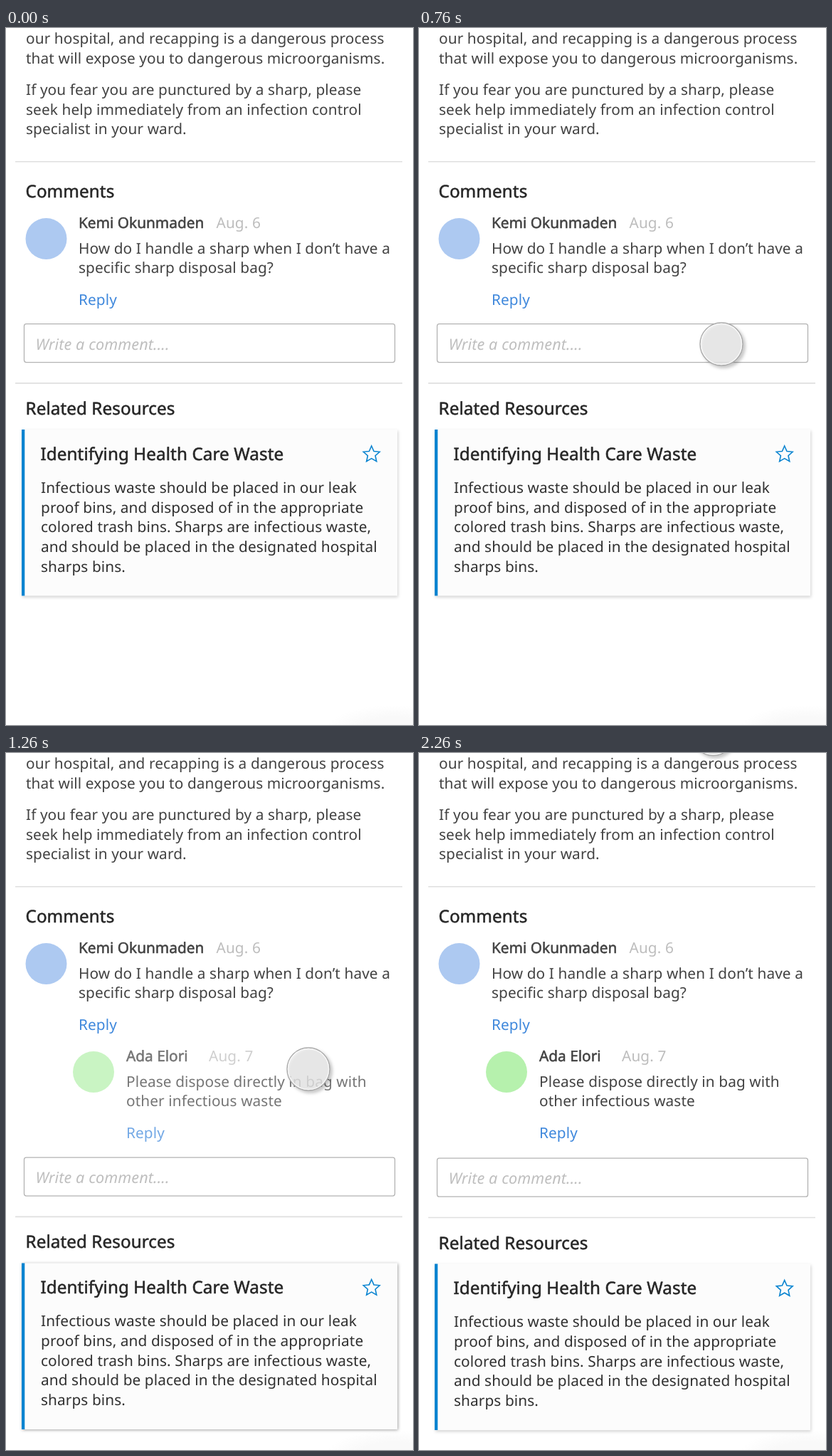
Recreate the animation shown at these times as an HTML page. Size 572 px wide and 979 px high, loop 2.28 s.

```html
<!DOCTYPE html>
<html lang="en">
<head>
<meta charset="utf-8">
<title>Comment thread</title>
<style>
html, body { margin: 0; width: 100%; height: 100%; overflow: hidden; background: #fff; }
svg { display: block; width: 572px; height: 979px; }
text {
  font: 20.8px "Noto Sans", "Open Sans", sans-serif; letter-spacing: .1px;
  fill: #424242; text-rendering: geometricPrecision; white-space: pre;
}
.head { font-size: 24.2px; fill: #262626; stroke: #262626; stroke-width: .55px; }
.name { stroke: #424242; stroke-width: .55px; letter-spacing: 0; }
.date { fill: #bdbdbd; }
.link { fill: #3f88dc; }
.hint { fill: #bfbfbf; font-size: 21.6px; font-style: italic; }
.card { fill: #303030; }
.rule { stroke: #dfdfdf; stroke-width: 1.6px; }
#panel { fill: #fcfcfc; }
#star { fill: none; stroke: #0a84d0; stroke-width: 1.6px; }
</style>
</head>
<body>
<svg viewBox="0 0 572 979">
  <defs>
    <radialGradient id="haze">
      <stop offset=".5" stop-color="#f9f9f9"/>
      <stop offset="1" stop-color="#fff"/>
    </radialGradient>
  </defs>
  <ellipse cx="545" cy="985" rx="95" ry="34" fill="url(#haze)"/>
  <g id="top">
    <path class="rule" d="M13 187.7H557"/>
    <circle cx="56.5" cy="296" r="29" fill="#adc9f1"/>
  </g>
  <g id="reply">
    <circle cx="123" cy="448" r="29" fill="#b6f1ad"/>
  </g>
  <g id="lower">
    <rect x="25.5" y="415.6" width="521" height="54" rx="3" fill="#fff" stroke="#b3b3b3" stroke-width="1.3"/>
    <path class="rule" d="M13 498.9H557"/>
    <rect id="panel" x="22" y="564" width="528" height="233.5"/>
    <path fill="#0a84d0" d="M22 564h4.3v233.5H22z"/>
    <polygon id="star"/>
  </g>
  <g id="cursor">
    <circle r="30" fill="#eee" fill-opacity=".78" stroke="#a8a8a8" stroke-width="1.4"/>
    <circle r="28.5" fill="none" stroke="#f6f6f6" stroke-width="1.4"/>
  </g>
</svg>
<script>
const LOOP = 2280;
const $ = id => document.getElementById(id);
const clamp = v => Math.max(0, Math.min(1, v));
const span = (t, from, to) => clamp((t - from) / (to - from));

function write(group, cls, x, y, ...lines) {
  lines.forEach((line, i) => {
    const el = document.createElementNS("http://www.w3.org/2000/svg", "text");
    el.setAttribute("class", cls);
    el.setAttribute("x", x);
    el.setAttribute("y", y + i * 27.7);
    el.textContent = line;
    $(group).append(el);
  });
  return $(group).lastChild;
}

write("top", "", 28, 22, "our hospital, and recapping is a dangerous process",
  "that will expose you to dangerous microorganisms.");
write("top", "", 28, 94, "If you fear you are punctured by a sharp, please",
  "seek help immediately from an infection control", "specialist in your ward.");
write("top", "head", 27.5, 237.5, "Comments");
write("top", "name", 102, 280.5, "Kemi Okunmaden");
write("top", "date", 295.5, 280.5, "Aug. 6");
write("top", "", 102, 316.5, "How do I handle a sharp when I don’t have a", "specific sharp disposal bag?");
write("top", "link", 102, 388.5, "Reply");

write("reply", "name", 169, 432.5, "Ada Elori");
write("reply", "date", 285, 432.5, "Aug. 7");
write("reply", "", 169, 468.5, "Please dispose directly in bag with", "other infectious waste");
write("reply", "link", 169, 540.5, "Reply");

write("lower", "hint", 41.5, 451.8, "Write a comment....");
const related = write("lower", "head", 27.5, 543, "Related Resources");
write("lower", "head", 48.5, 606.7, "Identifying Health Care Waste");
write("lower", "card", 49, 652.8, "Infectious waste should be placed in our leak",
  "proof bins, and disposed of in the appropriate",
  "colored trash bins. Sharps are infectious waste,",
  "and should be placed in the designated hospital", "sharps bins.");

$("star").setAttribute("points", Array.from({ length: 10 }, (_, i) => {
  const a = i * Math.PI / 5, r = i % 2 ? 5.6 : 12;
  return [513.7 + r * Math.sin(a), 599 - r * Math.cos(a)];
}).join(" "));

// Glide in from above, rest, then brush past the top edge.
function cursorAt(t) {
  if (t < 1540) {
    const k = 3.7, end = Math.exp(-k);
    const left = (Math.exp(-k * span(t, 45, 600)) - end) / (1 - end);
    return [425 + 45 * left, 444 - 478 * left - (t < 45 ? 40 : 0)];
  }
  const u = span(t, 1950, 2295);
  return [413 + 48 * (1 - u) ** 2, t < 1950 ? -80 : -34 + 25 * Math.sin(Math.PI * u)];
}

const shadow = (x, y, alpha) => `drop-shadow(${x}px ${y}px 2px rgba(0, 0, 0, ${alpha}))`;

function draw() {
  const t = performance.now() % LOOP;
  const u = span(t, 1150, 1350);
  const shift = t < 1080 ? 0 : 153.6 - 65.1 * (1 - u) ** 5;
  $("lower").setAttribute("transform", `translate(0 ${shift})`);
  related.style.opacity = t < 1080 ? 1 : 1 - .23 * (1 - u) ** 4;
  $("reply").style.opacity = 1 - (1 - u) ** 1.6;

  const moving = t >= 1080 && t < 1540;
  $("panel").style.filter = shadow(1, moving ? 1 : 2, moving ? .36 : .18);

  const pressed = t >= 620 && t < 760;
  $("cursor").setAttribute("transform", `translate(${cursorAt(t)})`);
  $("cursor").style.filter = pressed ? "none" : shadow(3, 3, .25);
  requestAnimationFrame(draw);
}
draw();
</script>
</body>
</html>
```
